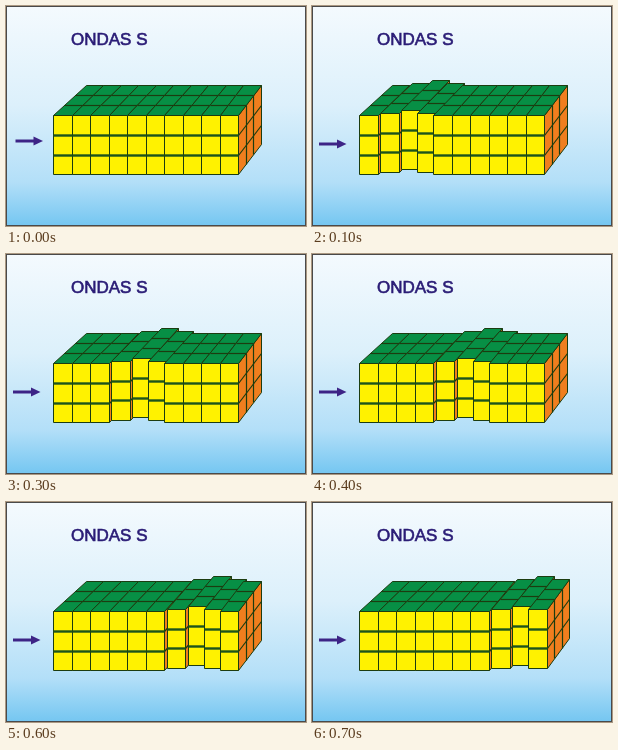
Recreate the animation shown at these times as an HTML page with a canvas. Size 300 px wide and 220 px high, loop 0.8 s.

```html
<!DOCTYPE html>
<html lang="es">
<head>
<meta charset="utf-8">
<title>Ondas S</title>
<style>
  html, body { margin: 0; width: 100%; height: 100%; overflow: hidden; }
  canvas { display: block; width: 300px; height: 220px; }
</style>
</head>
<body>
<canvas id="stage" width="300" height="220"></canvas>
<script>
const ctx = document.getElementById('stage').getContext('2d');
const STEP = 100, STEPS = 8;
const COLS = 10, ROWS = 3, LAYERS = 3;
const GREEN = '#078f45', YELLOW = '#fff200', ORANGE = '#f07e1e';
const EDGE = '#1c3c10', GAP = '#1c541c', INK = '#2a1c76', ARROW = '#3d2486';

// Block corners: the depth edges converge slightly towards the back
const front = { x: 47.5, y: 109.5, w: 18.5, h: 59 };
const back = { x: 80, y: 79.5, w: 17.5 };

const mix = (a, b, t) => a + (b - a) * t;
const snap = n => Math.ceil(n - 0.5) + 0.5;

// Column edge u, depth v (0..1), height h (0..1 downwards)
function point(u, v, h, shift) {
  const x = mix(front.x + u * front.w, back.x + u * back.w, v);
  const y = mix(front.y, back.y, v) + h * front.h;
  return [snap(x + shift), snap(y - shift)];
}

function face(points, fill) {
  ctx.beginPath();
  points.forEach(p => ctx.lineTo(p[0], p[1]));
  ctx.closePath();
  ctx.fillStyle = fill;
  ctx.fill();
  ctx.stroke();
}

function line(a, b, width, color) {
  ctx.beginPath();
  ctx.moveTo(a[0], a[1]);
  ctx.lineTo(b[0], b[1]);
  ctx.lineWidth = width;
  ctx.strokeStyle = color;
  ctx.stroke();
}

function column(i, shift) {
  const at = (u, v, h) => point(i + u, v, h, shift);
  ctx.lineWidth = 1;
  ctx.strokeStyle = EDGE;
  face([at(1, 0, 0), at(1, 1, 0), at(1, 1, 1), at(1, 0, 1)], ORANGE);
  face([at(0, 0, 0), at(1, 0, 0), at(1, 1, 0), at(0, 1, 0)], GREEN);
  face([at(0, 0, 0), at(1, 0, 0), at(1, 0, 1), at(0, 0, 1)], YELLOW);

  for (let k = 1; k < LAYERS; k++) {
    const v = k / LAYERS;
    line(at(0, v, 0), at(1, v, 0), 1.2, EDGE);
    line(at(1, v, 0), at(1, v, 1), 1.2, EDGE);
  }
  for (let k = 1; k < ROWS; k++) {
    const h = k / ROWS;
    line(at(1, 0, h), at(1, 1, h), 1.2, EDGE);
    line(at(0, 0, h), at(1, 0, h), 2.4, GAP);
  }
}

function background() {
  const sky = ctx.createLinearGradient(0, 0, 0, 220);
  [[0, '#f4fafe'], [0.45, '#dcf0fb'], [0.8, '#b3dff8'], [1, '#74c6f1']]
    .forEach(([t, c]) => sky.addColorStop(t, c));
  ctx.fillStyle = sky;
  ctx.fillRect(0, 0, 300, 220);
  ctx.lineWidth = 1;
  ctx.strokeStyle = '#4a4a4a';
  ctx.strokeRect(0.5, 0.5, 299, 219);
}

function title() {
  ctx.font = '17px "Liberation Sans", Arial, sans-serif';
  ctx.fillStyle = ctx.strokeStyle = INK;
  ctx.lineWidth = 0.6;
  ctx.fillText('ONDAS S', 65, 39);
  ctx.strokeText('ONDAS S', 65, 39);
}

function arrow(x, y) {
  line([x, y], [x + 20, y], 3, ARROW);
  ctx.beginPath();
  [[27.5, 0], [18, -4.5], [18, 4.5]]
    .forEach(([dx, dy]) => ctx.lineTo(x + dx, y + dy));
  ctx.closePath();
  ctx.fillStyle = ARROW;
  ctx.fill();
}

function draw(step) {
  background();
  title();
  if (step) arrow(7, 138);
  else arrow(9.5, 135);

  // The bump is three columns wide and advances one column per step
  const peak = step ? step + 1 : -9;
  for (let i = 0; i < COLS; i++) {
    column(i, 2.5 * Math.max(0, 2 - Math.abs(i - peak)));
  }
}

const start = performance.now();
let shown = -1;
function tick() {
  const step = Math.floor((performance.now() - start) / STEP) % STEPS;
  if (step !== shown) draw(shown = step);
  requestAnimationFrame(tick);
}
tick();
</script>
</body>
</html>
```
